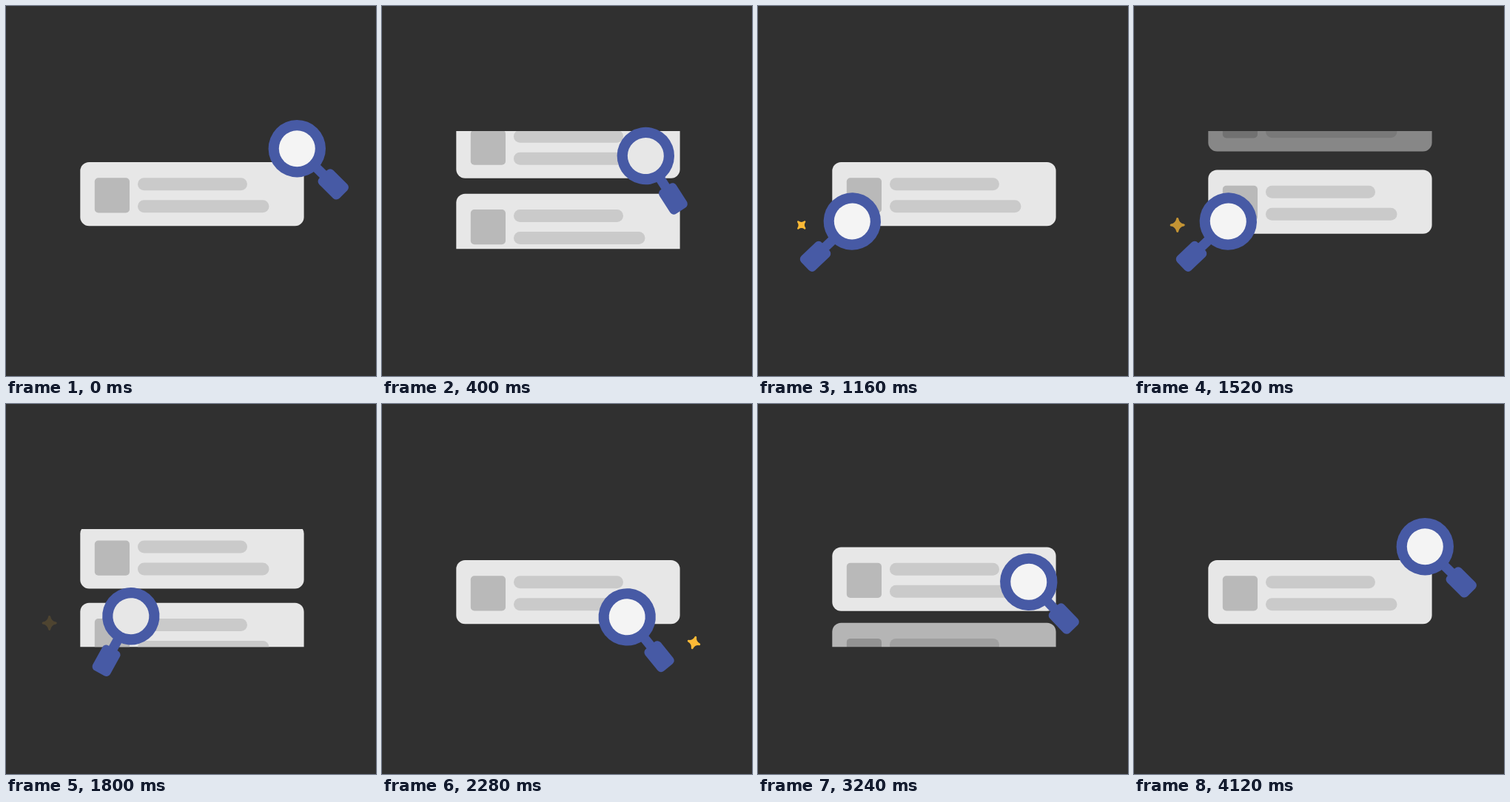
An HTML page that plays this animation: 500x500 px, repeating every 4200 ms.

```html
<!DOCTYPE html>
<html>
<head>
<meta charset="utf-8">
<style>
  html, body { margin: 0; height: 100%; overflow: hidden; background: #303030; }
  svg { display: block; width: 100%; height: 100%; }
</style>
</head>
<body>
<svg viewBox="0 0 500 500">
  <defs>
    <clipPath id="window"><rect x="95" y="169" width="315" height="159.3"/></clipPath>
    <g id="card">
      <rect x="100.3" y="211" width="302.3" height="86.3" rx="12" fill="#e7e7e7"/>
      <rect x="119.8" y="232.2" width="47.2" height="47.2" rx="5" fill="#b9b9b9"/>
      <rect x="178" y="232.2" width="148" height="17" rx="8.5" fill="#cacaca"/>
      <rect x="178" y="262.2" width="177.5" height="17" rx="8.5" fill="#cacaca"/>
    </g>
    <path id="star" fill="#fbb936" stroke="#fbb936" stroke-width="3" stroke-linejoin="round"
      d="M0-8.5Q1.3-1.3 8.5 0Q1.3 1.3 0 8.5Q-1.3 1.3-8.5 0Q-1.3-1.3 0-8.5Z"/>
  </defs>
  <g clip-path="url(#window)">
    <use id="oldCard" href="#card"/>
    <use id="newCard" href="#card"/>
  </g>
  <use id="starLeft" href="#star"/>
  <use id="starRight" href="#star"/>
  <g id="glass" fill="#475aa5">
    <rect x="34" y="-6.5" width="20" height="13"/>
    <rect x="49.5" y="-13.5" width="38.5" height="27" rx="6"/>
    <circle r="38.7"/>
    <circle id="lens" r="24.5"/>
  </g>
</svg>
<script>
const LOOP = 4200;
const $ = id => document.getElementById(id);

// Smooth progress from 0 to 1 between two times
const ease = (t, from, to) => {
  const k = Math.min(1, Math.max(0, (t - from) / (to - from)));
  return k * k * (3 - 2 * k);
};
const mix = (a, b, p) => a + (b - a) * p;

const scrolls = [40, 1360, 2640];
const SCROLL = 800;

// Resting poses of the glass: x, y, handle angle
const right = [393.3, 192.7, 44.6];
const left = [127.3, 291, 136.4];
const low = [338, 288.5, 48];
const moves = [
  { start: 237, end: 937, from: right, to: left, lift: 8, dim: true },
  { start: 1576, end: 2366, from: left, to: low, lift: 6, dim: true },
  { start: 2940, end: 3540, from: low, to: right, lift: 0 }
];

function place(id, y, opacity) {
  $(id).setAttribute('transform', `translate(0 ${y})`);
  $(id).setAttribute('opacity', opacity);
}

function drawCards(t) {
  const start = scrolls.findLast(s => s <= t) ?? -SCROLL;
  const k = Math.min(1, (t - start) / SCROLL);
  const p = ease(k, 0, 1);
  place('oldCard', 100.2 * p, 1 - ease(k, .66, .93));
  place('newCard', -112.7 * (1 - p), ease(k, .07, .34));
}

function drawGlass(t) {
  const move = moves.findLast(m => m.start <= t) ?? moves[0];
  const p = ease(t, move.start, move.end);
  const [x, y, angle] = move.from.map((v, i) => mix(v, move.to[i], p));
  const arc = move.lift * 4 * p * (1 - p);
  $('glass').setAttribute('transform', `translate(${x} ${y - arc}) rotate(${angle})`);
  $('lens').setAttribute('fill', move.dim && p > .05 && p < .95 ? '#e7e7e7' : '#f4f4f4');
}

function drawStar(id, x, y, age) {
  const p = ease(age, 0, 620);
  $(id).setAttribute('transform',
    `translate(${x} ${y}) rotate(${180 * (1 - p)}) scale(${p})`);
  $(id).setAttribute('opacity', Math.min(1, Math.max(0, (1130 - age) / 480)));
}

function draw(now) {
  const t = now % LOOP;
  drawCards(t);
  drawGlass(t);
  drawStar('starLeft', 58.7, 296, t - 742);
  drawStar('starRight', 421.5, 322.5, t - 1780);
}

const begin = performance.now();
function tick() {
  draw(performance.now() - begin);
  requestAnimationFrame(tick);
}
tick();
</script>
</body>
</html>
```
